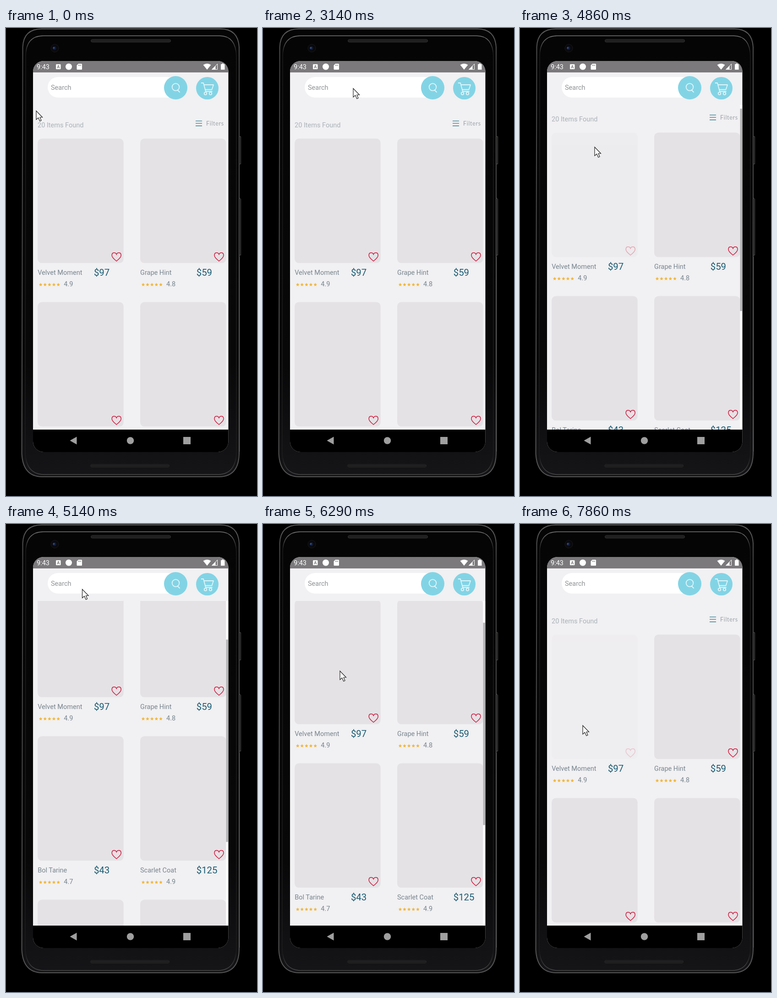
Recreate the animation shown at these times as an HTML page. Size 548 px wide and 1022 px high, loop 8000 ms.

```html
<!DOCTYPE html>
<html lang="en">
<head>
<meta charset="utf-8">
<title>Shop list</title>
<style>
  html, body { margin: 0; width: 100%; height: 100%; overflow: hidden; background: #000; }
  svg { display: block; width: 548px; height: 1022px; }
  text { font: 14.5px Roboto, sans-serif; fill: #77858f; }
  .price { font-size: 20.4px; fill: #1a5c73; }
  .found { fill: #a9b2b8; }
  .filters { font: 12.5px Lato, sans-serif; letter-spacing: .7px; fill: #9aa2a8; }
  .icon { fill: none; stroke: #e2f6fa; stroke-width: 1.8; stroke-linejoin: round; stroke-linecap: round; }
</style>
</head>
<body>
<svg viewBox="0 0 548 1022">
  <defs>
    <linearGradient id="body" x2="0" y2="1">
      <stop stop-color="#050506"/><stop offset=".75" stop-color="#080809"/><stop offset="1" stop-color="#151518"/>
    </linearGradient>
    <linearGradient id="rim" x2="0" y2="1">
      <stop stop-color="#5c5c5c"/><stop offset=".08" stop-color="#444"/><stop offset="1" stop-color="#555"/>
    </linearGradient>
    <linearGradient id="plate" x2="0" y2="1">
      <stop stop-color="#777"/><stop offset=".04" stop-color="#1c1c1d"/><stop offset=".96" stop-color="#1c1c1d"/><stop offset="1" stop-color="#4a4a4a"/>
    </linearGradient>
    <pattern id="mesh" width="3" height="3" patternUnits="userSpaceOnUse">
      <rect width="3" height="3" fill="#1a1a1a"/><circle cx="1.5" cy="1.5" r=".8" fill="#343434"/>
    </pattern>
    <clipPath id="screen"><rect x="59" y="72" width="426.500" height="854" rx="23"/></clipPath>
    <clipPath id="view"><rect x="59" y="168" width="426.500" height="709"/></clipPath>
  </defs>

  <!-- phone -->
  <rect width="548" height="1022"/>
  <path d="M510 237h2.500v60h-2.500M510 371l2.500 3v122h-2.500M510 500V925" fill="#101010" stroke="#555"/>
  <path d="M36.500 42Q38 2 78 2H468Q507 2 509 42V930Q508 979 466 980H78Q37 979 34.500 930Z" fill="url(#body)" stroke="url(#rim)" stroke-width="2"/>
  <path d="M43 62Q43 17 82 17H466Q502 17 503 62V926Q502 974 464 975H82Q43 974 42 926Z" fill="url(#body)" stroke="url(#plate)" stroke-width="1.500"/>
  <rect x="185.500" y="25" width="174" height="6" rx="3" fill="url(#mesh)" stroke="#303030"/>
  <rect x="184.500" y="953" width="172" height="6" rx="3" fill="url(#mesh)" stroke="#242426"/>
  <circle cx="106.500" cy="44" r="8.500" fill="#09090c" stroke="#19191c"/>
  <circle cx="105.500" cy="44" r="4" fill="#131b30"/>
  <circle cx="104.500" cy="43.500" r="1.800" fill="#334f93"/>

  <g clip-path="url(#screen)">
    <rect x="59" y="72" width="427" height="854" fill="#f1f0f2"/>
    <rect x="59" y="72" width="427" height="25" fill="#7b797c"/>

    <!-- status bar -->
    <text x="67" y="90" style="fill:#fff">9:43</text>
    <rect x="109" y="79" width="10.500" height="11" rx="1.500" fill="#fff"/>
    <text x="111.200" y="87.800" style="font-size:9px;font-weight:700;fill:#7b797c">A</text>
    <circle cx="137" cy="84.500" r="7" fill="#fff"/>
    <path d="M158 78h6.500q1.500 0 1.500 1.500v10q0 1.500-1.500 1.500h-8.500q-1.500 0-1.500-1.500v-8z" fill="#fff"/>
    <path d="M158.500 80v3m2.300-3v3m2.300-3v3" stroke="#7b797c"/>
    <path d="M439 91l-8.500-10.500q8.500-5.500 17 0zM469 79h2.500v-1.500h3.500v1.500h2.500v12h-8.500z" fill="#fff"/>
    <path d="M449.500 90.500l12-12v12z" fill="none" stroke="#fff"/>
    <path d="M449 91l8.500-8.500v8.500z" fill="#fff"/>

    <g clip-path="url(#view)">
      <g id="list">
        <text class="found" x="69" y="216.500">20 Items Found</text>
        <path d="M414 203h14M414 208.300h14M414 213.600h14" stroke="#4d8f9e" stroke-width="1.600"/>
        <text class="filters" x="437" y="213">Filters</text>
      </g>
      <g id="bar">
        <rect x="480.500" y="168" width="5" height="709" fill="#fff"/>
        <rect id="thumb" x="480.500" width="5" height="442" fill="#b4b3b5"/>
      </g>
    </g>

    <!-- search and cart -->
    <rect x="91" y="107" width="290" height="45" rx="22.500" fill="#fff"/>
    <text x="98" y="135" style="fill:#909295">Search</text>
    <circle cx="370.500" cy="130.500" r="25.500" fill="#82d4e5"/>
    <circle cx="439.500" cy="131.500" r="24.500" fill="#82d4e5"/>
    <g class="icon">
      <circle cx="370.500" cy="129" r="7.800"/>
      <path d="M374.500 135.500l4.500 4.500M426.500 120h4.500l5 18.500h14M432 124h21l-3.500 10.500h-14.500"/>
      <circle cx="435.500" cy="143" r="2.800"/><circle cx="446.500" cy="143" r="2.800"/>
    </g>

    <!-- navigation -->
    <rect x="59" y="877" width="427" height="49"/>
    <path d="M139.500 901l15-8.500v17zM387 893h16v16h-16z" fill="#9f9f9f"/>
    <circle cx="271.500" cy="901" r="7.700" fill="#9f9f9f"/>
  </g>

  <path id="cursor" d="M0 0V19L4.500 15L8 22.500L11 21L8 14H13.500Z" fill="#fff" stroke="#222" stroke-width="1.200"/>
</svg>

<script>
const STEP = 1000 / 7, STEPS = 56;
const $ = id => document.getElementById(id);

const items = [
  ['Velvet Moment', 97, 4.9], ['Grape Hint', 59, 4.8],
  ['Bol Tarine', 43, 4.7], ['Scarlet Coat', 125, 4.9],
  null, null
];

function star(cx) {
  let d = '';
  for (let i = 0; i < 10; i++) {
    const a = i * Math.PI / 5, r = i % 2 ? 2 : 4;
    d += (i ? 'L' : 'M') + (cx + r * Math.sin(a)).toFixed(2) + ' ' + (319 - r * Math.cos(a)).toFixed(2);
  }
  return d + 'Z';
}
const stars = [6.5, 16, 25.7, 35.3, 45].map(star).join('');

function card(item, i) {
  const x = i % 2 ? 293 : 69.2, y = 241.5 + 357 * (i >> 1);
  const label = item ? `
    <text y="297.500">${item[0]}</text>
    <text class="price" x="122.700" y="299">$${item[1]}</text>
    <path d="${stars}" fill="#efb83f"/>
    <text x="57" y="322.500">${item[2]}</text>` : '';
  return `<g transform="translate(${x} ${y})">
    <g id="pic${i}"><rect width="187.500" height="271.800" rx="9" fill="#e4e2e5"/>
    <path transform="translate(172 258)" d="M0-5C-2-10-10-10.500-10-3C-10 2-4 6 0 9.500C4 6 10 2 10-3C10-10.500 2-10 0-5Z"
      fill="none" stroke="#d0183c" stroke-width="1.500"/></g>${label}</g>`;
}
$('list').insertAdjacentHTML('beforeend', items.map(card).join(''));

// Tracks: [step, value, ...]
const pointer = [
  [0, 66, 181], [1, 64, 165], [2, 76, 122], [4, 132, 50], [5, 158, 42], [8, 206, 81], [11, 206, 81],
  [13, 203, 110], [16, 203, 110], [22, 197, 132], [24, 193, 140], [27, 186, 150], [29, 186, 150],
  [31, 162, 290], [33, 162, 290], [34, 163, 260], [35, 165, 185], [37, 168, 100], [39, 170, 71],
  [40, 171, 42], [41, 171, 36], [42, 171, 62], [44, 168, 321], [45, 165, 395], [46, 162, 420],
  [47, 162, 420], [48, 161, 375], [50, 160, 140], [51, 158, 36], [52, 154, 120], [54, 140, 425], [55, 137, 440]
];
const scroll = [
  [33, 0], [34, 13], [35, 80], [37, 190], [39, 245], [41, 284], [42, 270], [44, 76], [45, 12], [46, 0],
  [47, 0], [48, 15], [50, 200], [51, 275], [52, 240], [53, 90], [54, 0]
];
const fade = [[33, 1], [34, .35], [36, 1], [47, 1], [48, .35], [50, 1], [54, 1], [55, .2]];

function at(track, s) {
  const n = track.findIndex(k => k[0] >= s);
  if (n < 0) return track[track.length - 1].slice(1);
  if (!n) return track[0].slice(1);
  const a = track[n - 1], b = track[n], p = (s - a[0]) / (b[0] - a[0]);
  return a.slice(1).map((v, i) => v + (b[i + 1] - v) * p);
}

function draw(ms) {
  const s = Math.floor((ms + 4) / STEP) % STEPS;
  const [x, y] = at(pointer, s), [top] = at(scroll, s);
  $('cursor').setAttribute('transform', `translate(${x} ${y})`);
  $('list').setAttribute('transform', `translate(0 ${-top})`);
  $('thumb').setAttribute('y', 168 + top * .625);
  $('bar').setAttribute('opacity', top > 0 ? 1 : 0);
  $('pic0').setAttribute('opacity', at(fade, s)[0]);
}

const start = performance.now();
function tick() {
  draw(performance.now() - start);
  requestAnimationFrame(tick);
}
tick();
</script>
</body>
</html>
```
